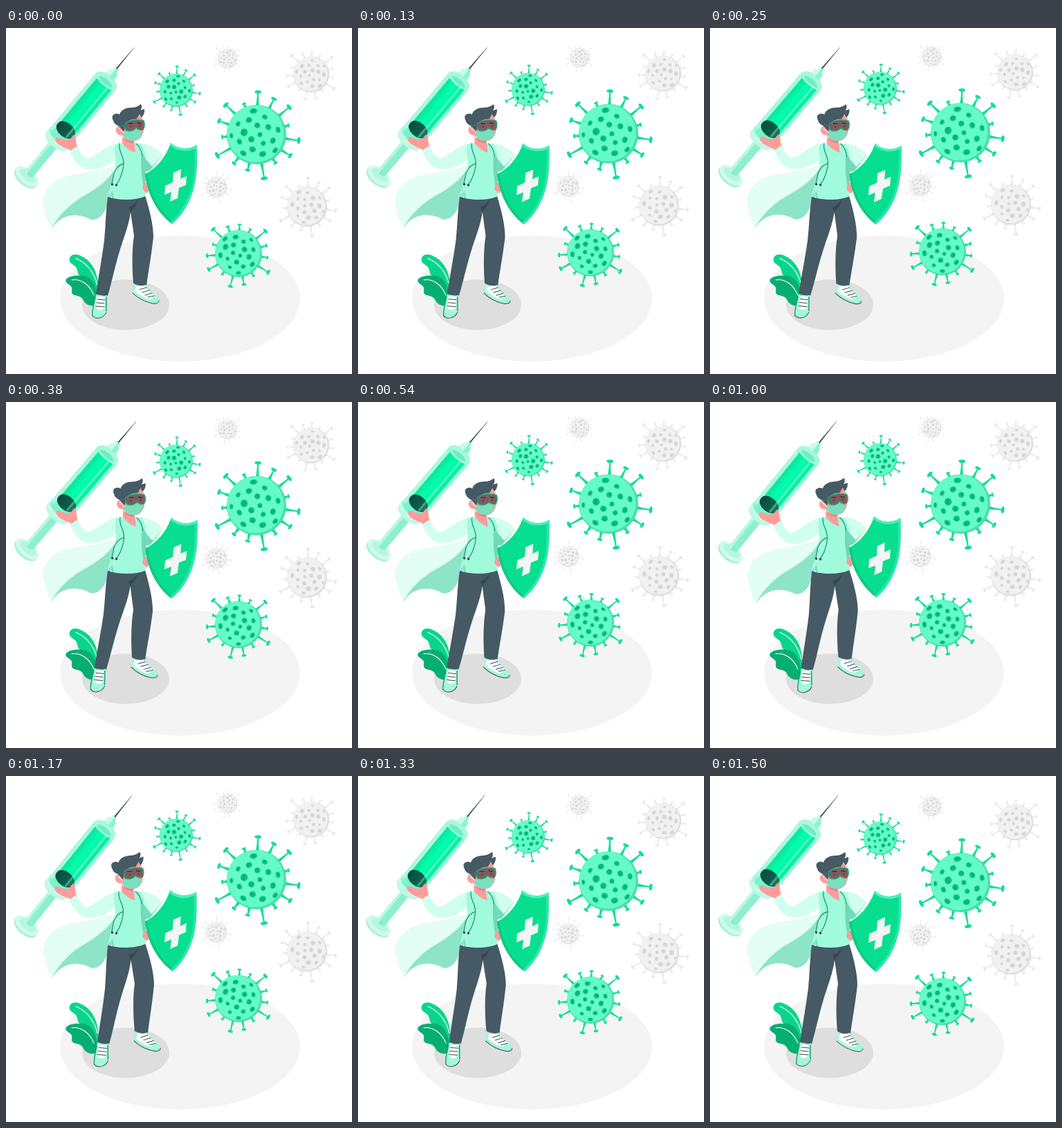
These frames come from a looping animation (500x500 px, 1540 ms). An HTML page:

```html
<!DOCTYPE html>
<html lang="en">
<head>
<meta charset="utf-8">
<title>Hero doctor and viruses</title>
<style>
html, body { margin: 0; width: 100%; height: 100%; overflow: hidden; background: #fff; }
svg { display: block; width: 100vw; height: 100vh; }
</style>
</head>
<body>
<svg viewBox="0 0 500 500" fill="none" stroke-linecap="round" stroke-linejoin="round">
  <defs>
    <linearGradient id="liquid">
      <stop offset="0" stop-color="#0be59a"/><stop offset=".45" stop-color="#00ffae"/><stop offset="1" stop-color="#08eca0"/>
    </linearGradient>
    <linearGradient id="shell">
      <stop offset="0" stop-color="#a6f8dc"/><stop offset=".18" stop-color="#7af4cc"/>
      <stop offset=".8" stop-color="#70f2c7"/><stop offset="1" stop-color="#aaf9df"/>
    </linearGradient>
    <linearGradient id="stopper">
      <stop offset="0" stop-color="#0c4b40"/><stop offset=".6" stop-color="#0a5c49"/><stop offset="1" stop-color="#0a8a63"/>
    </linearGradient>
    <clipPath id="shieldClip"><use href="#shieldShape"/></clipPath>
  </defs>

  <ellipse cx="251.500" cy="391" rx="173.500" ry="91" fill="#f4f4f4"/>
  <ellipse cx="173" cy="400" rx="63" ry="36.500" fill="#dedede"/>

  <g id="plant">
    <path fill="#08d58c" d="M133 390C136 358 127 336 105 328C96 325 90 331 92 337C94 342 99 342 102 347C104 352 103 356 109 360C116 367 121 380 127 392Z"/>
    <path fill="#07ae72" d="M131 400C134 378 126 360 112 358C101 357 91 358 87 363C84 369 93 370 95 375C96 380 93 384 99 386C106 388 109 388 112 394C116 401 125 403 131 400Z"/>
    <path stroke="#fff" stroke-width="1.100" d="M101 333C116 339 128 353 132 372M95 364C110 362 121 372 127 386"/>
  </g>

  <g id="hero">
    <g id="cape">
      <path fill="#e3fff5" stroke="#c8f3e4" stroke-width=".5" d="M160 198C143 207 106 210 85 216C64 223 52 238 55 256C58 270 62 282 67 290C76 271 95 253 112 243C133 231 149 219 158 207Z"/>
      <path fill="#8ee4c7" d="M66 290C75 271 94 253 112 243C133 231 148 219 156 206L154 242L147 249C145 266 136 278 123 277C112 271 101 269 89 272C79 275 72 281 66 290Z"/>
    </g>

    <g id="syringe" transform="translate(30 215) rotate(39.700)">
      <ellipse rx="20" ry="11" cy="2" fill="#a7f2d7"/>
      <ellipse rx="20" ry="10.500" cy="-.5" fill="#d0fbec"/>
      <ellipse rx="14" ry="6.500" cy="-2" fill="#b6f6df"/>
      <path fill="#8cefcd" d="M-7-78V-5Q0 0 7-5V-78Z"/>
      <path fill="#b7f8e1" d="M-7-78V-5L-3-2V-78Z"/>
      <path fill="#bdf9e4" d="M-20-78V-69C-20-54 20-54 20-69V-78Z"/>
      <path fill="url(#shell)" d="M-19-177V-76C-18-65 18-65 19-76V-177C18-186-18-186-19-177Z"/>
      <path fill="url(#liquid)" d="M-13-176V-88H14V-176Q0-182-13-176Z"/>
      <ellipse cy="-88" rx="15" ry="10" fill="url(#stopper)" stroke="#064437" stroke-width=".8"/>
      <path fill="#fff" opacity=".3" d="M-17-174H-14V-76H-17ZM6-174H9V-80H6Z"/>
      <path stroke="#d5fff1" d="M-20-72C-18-61 18-61 20-72"/>
      <path fill="#a8f8dd" d="M-19-178C-18-187-10-187-8-189H8C10-187 18-187 19-178C15-171-15-171-19-178Z"/>
      <path fill="#6cefc2" d="M-13-178C-8-184 8-184 13-178C8-174-8-174-13-178Z"/>
      <path fill="#8df3d1" d="M-8-189L-7-197L-4-198L-3-204H3L4-198L7-197L8-189Q0-184-8-189Z"/>
      <path fill="#c6fdea" d="M-8-189L-7-197L-4-198L-3-204H0V-187Z"/>
      <path fill="#37474f" d="M-1-203L-.2-243H.2L1-203Z"/>
    </g>

    <g id="arms">
      <path fill="#ff9c9a" d="M71 161C72 156 78 159 82 161C87 162 91 163 94 159C97 155 99 153 100 156C101 162 101 168 104 174L96 179C91 174 84 174 79 170C75 168 72 165 71 161Z"/>
      <path fill="#6fdcb8" d="M193 167C207 168 219 175 226 184L208 206L199 208Z"/>
      <path fill="#d0ffee" d="M192 167C207 168 219 175 226 184L211 200C204 192 199 186 196 179Z"/>
      <path fill="#d0ffee" d="M92 178L102 171C107 180 112 187 118 189C131 184 145 170 159 167L167 183C153 197 133 206 117 204C106 203 98 191 92 178Z"/>
    </g>

    <g id="pants">
      <path fill="#455a64" d="M147 244C165 250 186 248 200 239C207 261 213 284 213 302C210 329 206 350 203 372Q193 374 184 369C182 345 182 320 185 300L180 266C178 284 169 306 164 323C157 346 153 367 147 387Q138 388 130 384C134 357 139 331 142 307C144 286 144 265 147 244Z"/>
      <path fill="#37474f" d="M190 247C188 254 182 257 177 259L180 266C184 260 190 256 190 247Z"/>
    </g>

    <g id="torso">
      <path fill="#a0fbdc" d="M158 168C165 166 178 166 193 167C200 170 203 183 202 199C201 213 201 229 202 243C188 249 170 249 156 246L154 235L146 245C151 229 155 216 158 201C160 190 155 178 158 168Z"/>
      <path fill="#71d9b7" d="M154 235L156 246H153ZM196 180C194 202 196 224 202 239V190Z"/>
      <path fill="#ff9c9a" d="M168 154L185 160L187 180C178 177 172 172 168 166Z"/>
      <path fill="#e87f80" d="M170 161C176 165 180 166 184 166L185 162Z"/>
      <path stroke="#249473" stroke-width="1.300" d="M164 167C162 178 170 184 170 195C170 205 167 212 164 219L159 227M170 196C162 198 156 206 155 215L153 225M188 167C193 171 196 177 197 185"/>
      <path stroke="#37474f" stroke-width="3.500" d="M153.500 226h0M159.500 227h0"/>
    </g>

    <g id="head">
      <path fill="#ff9c9a" d="M167 136C175 129 190 127 198 132L199 147C198 158 191 164 183 163C173 163 167 157 166 148Z"/>
      <path fill="#ff9c9a" d="M168 145C164 139 158 143 159 149C161 155 166 157 170 152Z"/>
      <path fill="#455a64" d="M167 146C162 139 157 141 155 134C153 130 153 126 156 125C159 123 162 124 164 125C166 118 174 115 181 115C187 115 191 113 195 110C197 113 196 117 194 119L200 117C201 124 197 129 193 132C184 130 176 133 173 139L170 150Z"/>
      <path fill="#ff9c9a" d="M188 133L193 124L198 133Z"/>
      <path fill="#79dfbf" d="M169 149C176 151 183 147 188 147C192 148 195 149 197 150C196 157 192 163 184 163C176 164 170 160 169 149Z"/>
      <path stroke="#effff9" d="M163 145L170 151M166 156L171 158"/>
      <path fill="#624a51" fill-opacity=".8" stroke="#13ae7c" stroke-width="1.400" d="M172 138C179 132 191 132 199 134C201 139 200 144 198 147C194 148 191 147 188 144C186 148 180 150 174 148C171 146 171 141 172 138Z"/>
      <path stroke="#263238" stroke-width="1.300" d="M177 138H183M190 137L195 138M180 142V143M193 141V142"/>
      <path stroke="#0f8e68" stroke-width="1.400" d="M164 141H172"/>
    </g>

    <g id="shield">
      <path fill="#ff9c9a" d="M203 224C198 225 196 229 198 234L204 239L209 231Z"/>
      <path id="shieldShape" fill="#08de90" d="M201 211C217 203 231 187 238 166C249 176 264 176 276 169C276 192 277 217 269 239C262 259 252 273 240 283C222 270 205 245 201 211Z"/>
      <g clip-path="url(#shieldClip)" stroke-width="7">
        <path stroke="#13c786" d="M201 211C205 245 222 270 240 283"/>
        <path stroke="#2be8a8" d="M276 169C276 192 277 217 269 239C262 259 252 273 240 283"/>
        <path stroke="#4bf0b9" d="M238 166C249 176 264 176 276 169"/>
      </g>
      <path fill="#f3f5f4" d="M242 209L253 204L252 218L261 214L260 227L250 231L248 246L237 251L239 237L229 241L230 228L241 223Z"/>
    </g>

    <g id="shoes">
      <path fill="#a4f8da" d="M130 385C135 388 141 388 146 386C145 393 146 402 145 410C143 419 132 422 126 417C123 411 127 397 130 385Z"/>
      <path fill="#fff" d="M131 388L143 389L142 405C138 409 133 408 130 405Z"/>
      <path stroke="#0c9f70" stroke-width="1.400" d="M129 389C127 398 124 409 125 416M145 389V409"/>
      <path fill="#a4f8da" d="M184 370C190 373 197 373 202 371C206 378 214 383 220 389C223 395 218 399 211 398C200 395 190 389 183 383Z"/>
      <path fill="#fff" d="M188 373L201 373C205 379 210 383 215 387L207 392C197 389 191 384 186 380Z"/>
      <path stroke="#37474f" d="M132 392L143 393M131 397L142 398M130 402L142 403M125 416C130 422 141 420 145 411M193 378L203 375M197 382L207 379M201 386L211 383M205 389L214 387M183 383C191 391 202 396 212 398C217 399 221 397 221 394"/>
    </g>
  </g>
  <g id="viruses"></g>
</svg>
<script>
const LOOP = 1540, FRAMES = 38, TAU = 2 * Math.PI;
const SPIKES = 15, SPOTS = 18, GOLDEN = 137.508;
const $ = id => document.getElementById(id);

const green = { body: '#65fbc7', shade: '#49dfab', spike: '#11df94', spot: '#10d08b', deep: '#08b677' };
const gray = { body: '#f1f1f1', shade: '#dedede', spike: '#e9e9e9', spot: '#dedede', deep: '#d4d4d4' };

const viruses = [
  { x: 362, y: 154, r: 43, look: green },
  { x: 336, y: 326, r: 34, look: green },
  { x: 246, y: 90, r: 24, look: green },
  { x: 441, y: 67, r: 26, look: gray },
  { x: 435, y: 258, r: 29, look: gray },
  { x: 320, y: 44, r: 14, look: gray },
  { x: 304, y: 230, r: 15, look: gray }
];

function seeded(seed) {
  return () => (seed = seed * 16807 % 2147483647) / 2147483647;
}

// Everything below is drawn in units of the virus radius.
function spike(i, shift) {
  const len = 1.31 - .19 * Math.cos(TAU * (i - 3 - shift) / 2.75);
  const head = .07 + .05 * (len - 1.1) / .4;
  return `<g transform="rotate(${i * 360 / SPIKES - 88})">` +
    `<path d="M.96-.065Q1.060-.03 ${len}-.022V.022Q1.060 .03 .96 .065Z"/>` +
    `<ellipse cx="${len}" rx="${head / 2}" ry="${head}"/></g>`;
}

function spot(i, turn, rand, look) {
  const dist = .86 * Math.sqrt((i + .3) / SPOTS);
  const size = .085 + .055 * rand();
  const flat = Math.sqrt(1 - dist * dist * .8);
  return `<g transform="rotate(${turn + i * GOLDEN}) translate(${dist}) scale(${size * flat} ${size})">` +
    `<circle r="1" fill="${look.spot}"/><circle cx=".15" r=".72" fill="${look.deep}"/></g>`;
}

function virus({ x, y, r, look }, n) {
  const rand = seeded(n * 97 + 11);
  const list = (count, part) => Array.from({ length: count }, (_, i) => part(i)).join('');
  return `<g transform="translate(${x} ${y}) scale(${r})">` +
    `<g fill="${look.spike}">${list(SPIKES, i => spike(i + 1 - 1 || SPIKES, n % 2 / 2))}</g>` +
    `<circle r="1" fill="${look.shade}"/>` +
    `<ellipse cx="-.035" cy="-.03" rx=".955" ry=".96" fill="${look.body}"/>` +
    list(SPOTS, i => spot(i, n * 50, rand, look)) + '</g>';
}

$('viruses').innerHTML = viruses.map(virus).join('');

function draw(ms) {
  const step = Math.floor(ms % LOOP / LOOP * FRAMES);
  const u = step / (FRAMES - 1);
  const line = 1 - Math.abs(2 * u - 1), wave = (1 - Math.cos(TAU * u)) / 2;
  const lift = 9 * (.65 * line + .35 * wave);
  const tilt = .8 * Math.sin(TAU * u);
  $('viruses').setAttribute('transform', `translate(0 ${-lift})`);
  $('hero').setAttribute('transform', `rotate(${tilt} 172 232)`);
}

const start = performance.now();
function tick() {
  draw(performance.now() - start);
  requestAnimationFrame(tick);
}
draw(0);
requestAnimationFrame(tick);
</script>
</body>
</html>
```
